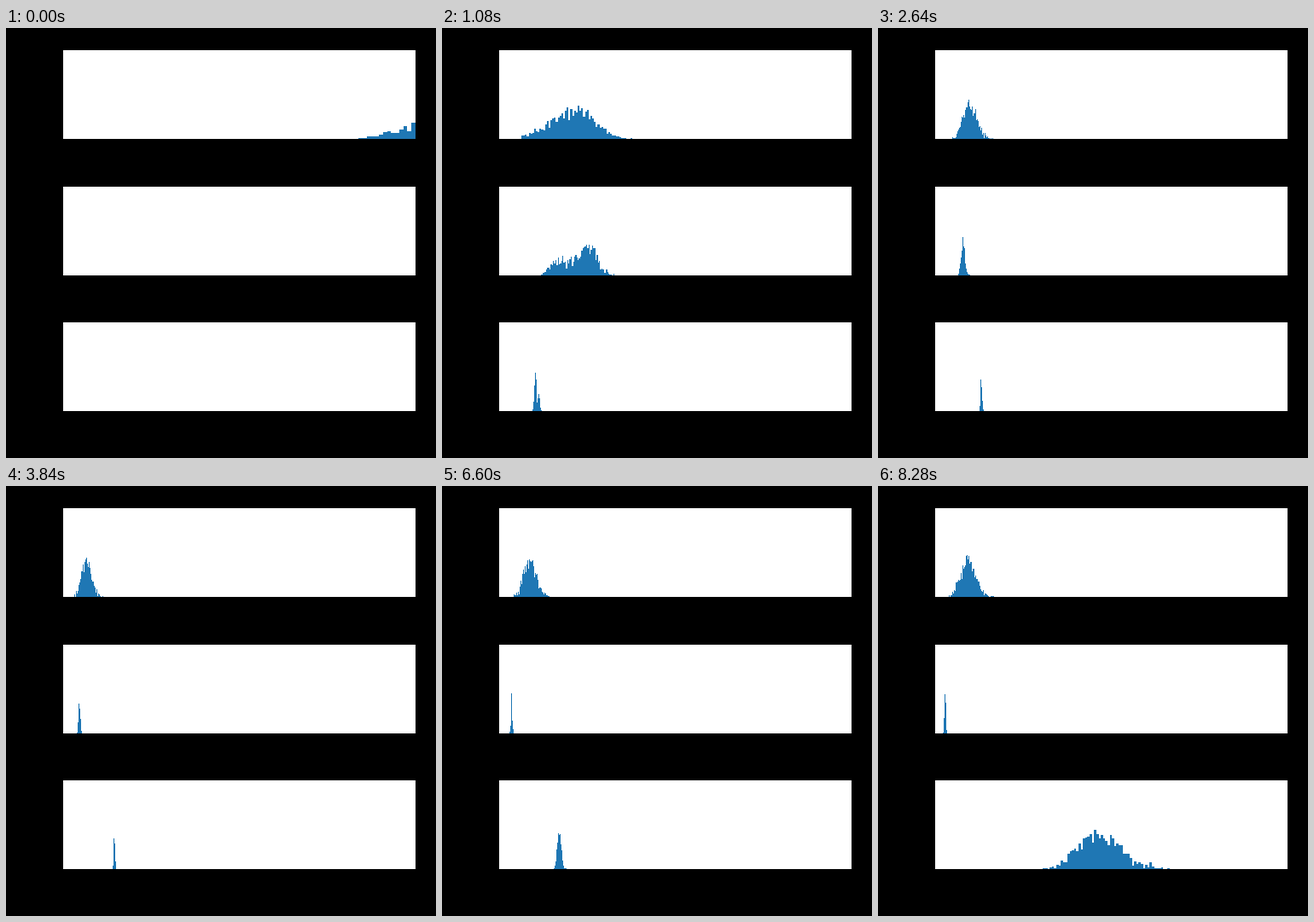
These frames come from a looping animation (504x504 px, 8400 ms). A matplotlib script:

```python
import numpy as np
import matplotlib.pyplot as plt
from matplotlib.animation import FuncAnimation

SIZE, FRAMES, INTERVAL = 504, 70, 120
LEFT, RIGHT, HEIGHT = 67, 480, 104
BINS, SAMPLES = 62, 1000
ORIGIN = 50  # the clouds drift geometrically away from this x

# Key moments shared by the centre and spread of every cloud of samples
KEYS = [0, 5, 9, 13, 32, 46, 56, 63, 69]

# One chart each: top edge, centres, spreads, and the clumps the cloud splits
# into as (offset, width, height), with offset and width in units of spread
CHARTS = [
    (26, [530, 266, 145, 122, 94, 97, 103, 108, 105],
     [45, 41, 20, 10.5, 5.6, 4.6, 7.5, 10, 8.5],
     [(-1.07, 0.9, 18), (1.44, 0.85, 27)]),
    (186, [590, 249, 150, 116, 86, 83, 81.3, 80, 78.8],
     [35, 31, 13, 4.2, 1.1, 0.7, 0.8, 0.9, 0.9],
     [(-2.16, 0.4, 15), (-0.2, 0.48, 15), (2.68, 0.55, 41)]),
    (345, [62, 100, 110, 116.3, 127, 130.2, 138, 162, 257],
     [0.8, 2.7, 1.7, 1.1, 0.7, 0.9, 2.6, 9, 24.5],
     [(-0.75, 0.5, 40), (1.5, 0.9, 10), (3.7, 0.25, 14)]),
]
UNIT_EDGES = np.linspace(-2.6, 4, BINS + 1)
UNIT = (UNIT_EDGES[:-1] + UNIT_EDGES[1:]) / 2


def glide(frame, values, origin=0):
    """Move geometrically, relative to an origin, between the key moments."""
    logs = np.log(np.array(values) - origin)
    return origin + np.exp(np.interp(frame, KEYS, logs))


def cloud_shape(split, clumps):
    """Expected bin counts: one skewed bump that separates into clumps."""
    skewed = np.where(UNIT < 0, 0.95, 1.1)
    shape = np.zeros(BINS)
    for offset, width, height in clumps:
        sigma = skewed * (1 - split) + width * split
        shape += height * np.exp(-((UNIT - offset * split) / sigma) ** 2 / 2)
    return SAMPLES * shape / shape.sum()


def histogram(frame, row):
    _, centres, spreads, clumps = CHARTS[row]
    split = np.interp(frame, [0, 5, 16], [0, 1, 0])
    mean = cloud_shape(split, clumps)
    rng = np.random.default_rng(frame * len(CHARTS) + row)
    counts = np.round(mean + 0.8 * np.sqrt(mean) * rng.normal(size=BINS))
    edges = glide(frame, centres, ORIGIN) + glide(frame, spreads) * UNIT_EDGES
    return np.maximum(counts, 0), np.round(edges)


def add_chart(top):
    ax = fig.add_axes([LEFT / SIZE, (SIZE - top - HEIGHT) / SIZE,
                       (RIGHT - LEFT) / SIZE, HEIGHT / SIZE])
    ax.spines[:].set_visible(False)
    bars = ax.stairs(np.zeros(BINS), UNIT_EDGES, fill=True, color="#1f77b4",
                     linewidth=0, antialiased=False)
    ax.set(xticks=[], yticks=[], xlim=(LEFT, RIGHT), ylim=(0, HEIGHT))
    return bars


def draw(frame):
    for row, bars in enumerate(charts):
        bars.set_data(*histogram(frame, row))
    return charts


fig = plt.figure(figsize=(SIZE / 72, SIZE / 72), dpi=72, facecolor="black")
charts = [add_chart(chart[0]) for chart in CHARTS]
anim = FuncAnimation(fig, draw, frames=FRAMES, interval=INTERVAL,
                     repeat=True, repeat_delay=0)
plt.show()
```
